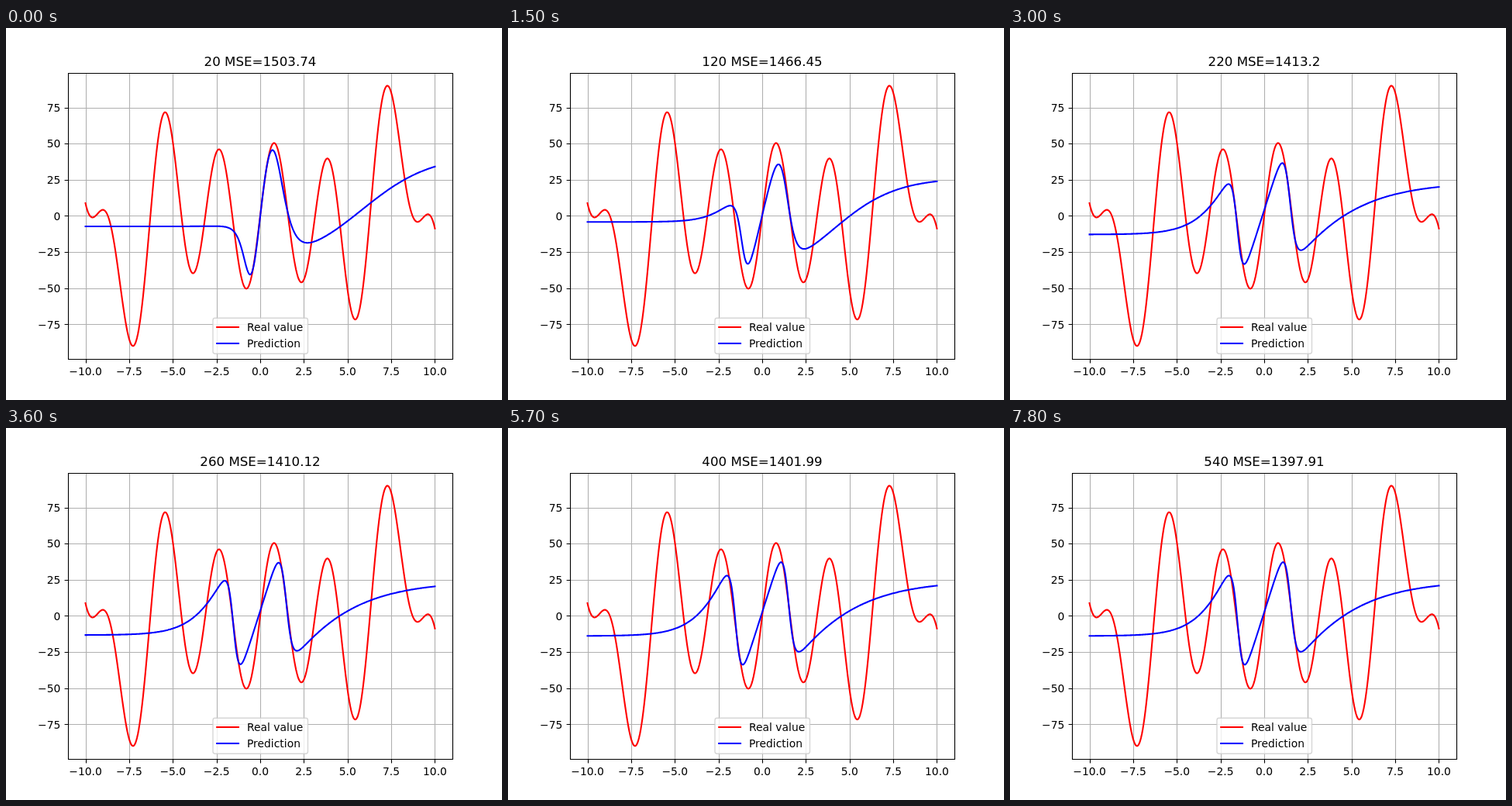
An HTML page that plays this animation: 640 by 480 pixels, repeating every 8000 ms.

```html
<!DOCTYPE html>
<html>
<head>
<meta charset="utf-8">
<style>
html, body { margin: 0; width: 100%; height: 100%; overflow: hidden; background: #fff; }
svg { display: block; width: 640px; height: 480px; font: 13.89px "DejaVu Sans", sans-serif; }
path { fill: none; stroke-width: 2.083; stroke-linejoin: round; stroke-linecap: square; }
#grid { stroke: #b0b0b0; stroke-width: 1.11; stroke-linecap: butt; }
#axes { stroke: #000; stroke-width: 1.11; stroke-linecap: butt; stroke-linejoin: miter; }
.real { stroke: #f00; }
.pred { stroke: #00f; }
</style>
</head>
<body>
<svg viewBox="0 0 640 480">
  <path id="grid"/>
  <path id="real" class="real"/>
  <path id="pred" class="pred"/>
  <path id="axes"/>
  <g id="labels"></g>
  <text id="title" x="328" y="49" text-anchor="middle" font-size="16.67"></text>
  <rect x="267" y="374.3" width="122.5" height="46" rx="2.8" fill="#fff" fill-opacity=".8" stroke="#ccc" stroke-opacity=".8" stroke-width="1.39"/>
  <path class="real" d="M272.2 386H300"/>
  <path class="pred" d="M272.2 407H300"/>
  <text x="311" y="391">Real value</text>
  <text x="311" y="412">Prediction</text>
</svg>
<script>
const $ = id => document.getElementById(id);
const px = x => 328 + x * 22.5455;
const py = y => 242.4 - y * 1.8642;
const snap = v => Math.floor(v + .5) + .5;
const lerp = (a, b, u) => a + (b - a) * u;
const sigmoid = v => 1 / (1 + Math.exp(-v));

function plot(id, f) {
  const pts = [];
  for (let i = -200; i <= 200; i++) {
    const x = i / 20;
    pts.push(px(x).toFixed(2) + " " + py(f(x)).toFixed(2));
  }
  $(id).setAttribute("d", "M" + pts.join("L"));
}

function label(text, x, y, anchor) {
  const el = document.createElementNS("http://www.w3.org/2000/svg", "text");
  el.setAttribute("x", x);
  el.setAttribute("y", y);
  el.setAttribute("text-anchor", anchor);
  el.textContent = text.replace("-", "\u2212");
  $("labels").append(el);
}

function drawAxes() {
  let grid = "", axes = "M80.5 58.5H576.5V427.5H80.5Z";
  for (let v = -10; v <= 10; v += 2.5) {
    const x = snap(px(v));
    grid += `M${x} 58V427`;
    axes += `M${x} 427.5v4.9`;
    label(v.toFixed(1), px(v), 448, "middle");
  }
  for (let v = -75; v <= 75; v += 25) {
    const y = snap(py(v));
    grid += `M80 ${y}H576`;
    axes += `M80.5 ${y}h-4.9`;
    label(String(v), 70.3, Math.round(py(v) + 5.3), "end");
  }
  $("grid").setAttribute("d", grid);
  $("axes").setAttribute("d", axes);
}

// The prediction is a left tail, a straight middle and a right tail, joined by
// two sigmoid gates [centre, steepness]. The fit settles after the last stage.
const stages = [
  { left: [-7.3, 1, 1.2],    gate1: [-.6, 4.2],   mid: [3, 130], gate2: [.86, 2.75], right: [42.5, 77, 5.8, .5] },
  { left: [-4.2, 30, 1.2],   gate1: [-1.12, 5.8], mid: [.5, 52], gate2: [1.35, 4],   right: [26.5, 73, 4, .55] },
  { left: [-12.9, 95, .9],   gate1: [-1.53, 6.6], mid: [4, 38],  gate2: [1.46, 5.8], right: [23.5, 207, -1, .37] },
  { left: [-13.9, 112, .9],  gate1: [-1.52, 6.6], mid: [2.5, 38], gate2: [1.49, 6.2], right: [24.5, 215, -1, .37] }
];
const leftTail = ({ left: [base, rise, k] }, x) => base + rise * sigmoid(k * (x + 1.6));
const middle = ({ mid: [offset, slope] }, x) => offset + slope * x;
const rightTail = ({ right: [top, drop, c, k] }, x) => top - drop * sigmoid(k * (c - x));
const gate = ([c, k], [c2, k2], u, x) => sigmoid(lerp(k, k2, u) * (x - lerp(c, c2, u)));

function predict(stage, x) {
  const i = Math.min(Math.floor(stage), stages.length - 2);
  const u = stage - i, a = stages[i], b = stages[i + 1];
  const mix = part => lerp(part(a, x), part(b, x), u);
  const inner = lerp(mix(leftTail), mix(middle), gate(a.gate1, b.gate1, u, x));
  return lerp(inner, mix(rightTail), gate(a.gate2, b.gate2, u, x));
}

// [step, error]
const errors = [[0, 1503.74], [5, 1466.45], [10, 1413.2], [15, 1405.49], [19, 1401.99], [23, 1399.85], [26, 1397.91]];
function errorAt(k) {
  const i = Math.max(1, errors.findIndex(e => e[0] >= k));
  const [k0, e0] = errors[i - 1], [k1, e1] = errors[i];
  return +lerp(e0, e1, (k - k0) / (k1 - k0)).toFixed(2);
}

let shown = -1;
function draw(time) {
  const k = Math.floor(time % 8000 / 300);
  if (k === shown) return;
  shown = k;
  plot("pred", x => predict(Math.min(k / 5, 3), x));
  $("title").textContent = `${20 * (k + 1)} MSE=${errorAt(k)}`;
}

drawAxes();
plot("real", x => x * x * Math.sin(x) + 50 * Math.sin(2 * x));
draw(0);
let start;
requestAnimationFrame(function tick(now) {
  start ??= now;
  draw(now - start);
  requestAnimationFrame(tick);
});
</script>
</body>
</html>
```
